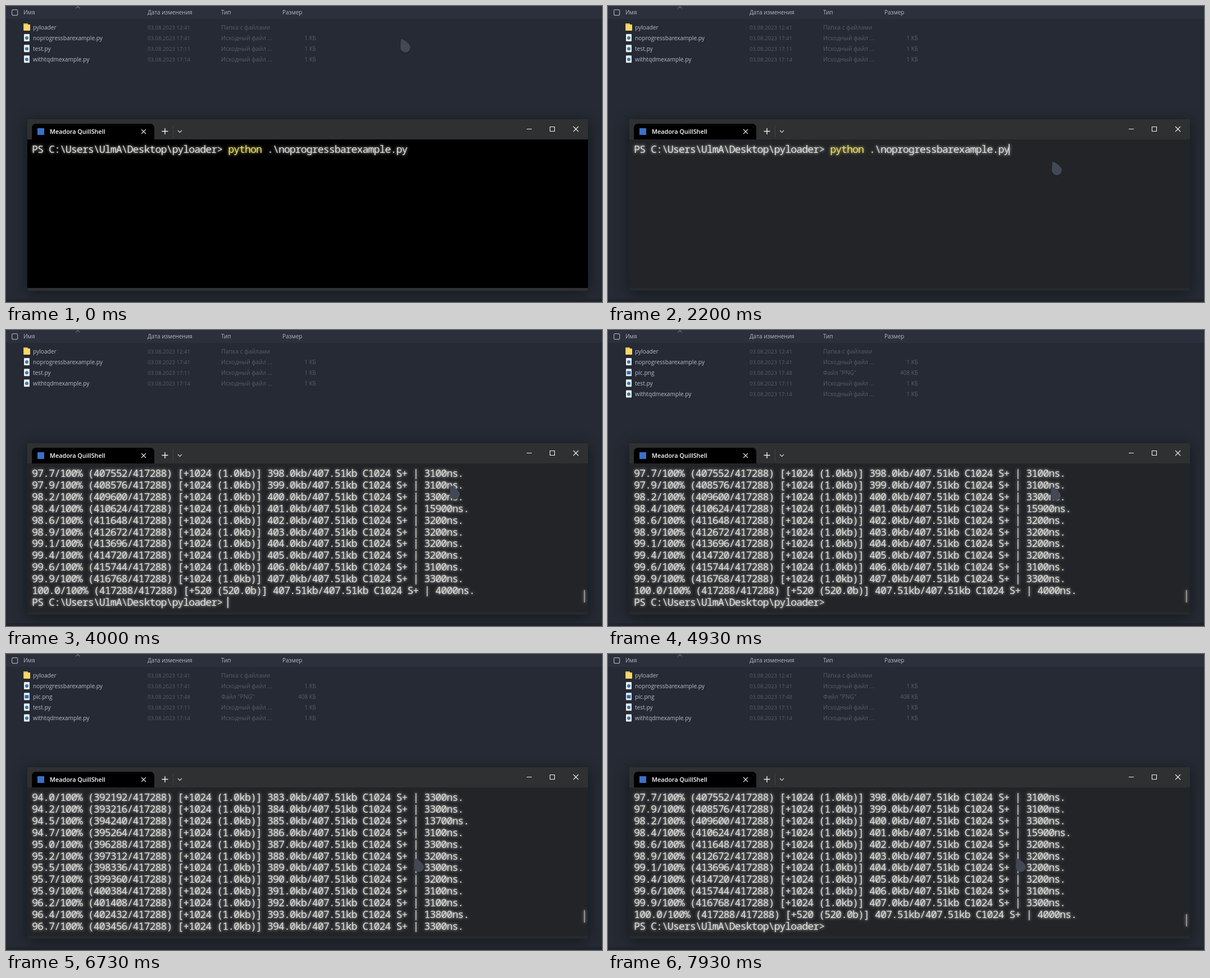
Recreate the animation shown at these times as an HTML page with a canvas. Size 1061 by 528 pixels, loop 8000 ms.

```html
<!DOCTYPE html>
<html lang="ru">
<head>
<meta charset="utf-8">
<style>
html, body { margin: 0; width: 100%; height: 100%; overflow: hidden; background: #252a34; }
canvas { display: block; }
</style>
</head>
<body>
<canvas id="stage" width="1061" height="528"></canvas>
<script>
const LOOP = 8000, ROWS = 12, CELL = 9.975, LINE = 20.9, LEFT = 46;
const CHUNK = 1024, TOTAL = 417288, LAST = Math.ceil(TOTAL / CHUNK);
const START = 2870, OUTPUT = 3330, FINISH = 3470, FILE_SHOWN = 4470;
const UI = '"Open Sans", "Noto Sans", sans-serif';
const MONO = '"Noto Sans Mono", "DejaVu Sans Mono", monospace';
const ctx = document.getElementById('stage').getContext('2d');

const PROMPT = 'PS C:\\Users\\UlmA\\Desktop\\pyloader> ';
const COMMAND = 'python', ARGUMENT = ' .\\noprogressbarexample.py';

const clamp = (v, lo, hi) => Math.min(hi, Math.max(lo, v));
const smooth = u => u * u * (3 - 2 * u);
const random = n => Math.abs(Math.sin(n * 12.9898) * 43758.5453) % 1;

// Every eighth chunk flushes a buffer and takes longer.
function timing(n) {
  if (n === LAST) return 4000;
  return n % 8 === 1 ? 13000 + 100 * Math.floor(random(n) * 40)
                     : 3100 + 100 * Math.floor(random(n) * 3);
}

function progressLine(n) {
  const done = Math.min(n * CHUNK, TOTAL), last = n === LAST;
  const step = last ? '+520 (520.0b)' : '+1024 (1.0kb)';
  const size = last ? '407.51' : n.toFixed(1);
  return `${(done / TOTAL * 100).toFixed(1)}/100% (${done}/${TOTAL}) [${step}] ` +
    `${size}kb/407.51kb C1024 S+ | ${timing(n)}ns.`;
}

// Pointer stops: time, x, y
const stops = [
  [130, 702, 59], [730, 796, 275], [1470, 796, 275], [2000, 790, 278],
  [4400, 790, 278], [4930, 788, 280], [5530, 787, 276], [6070, 726, 365]
];
function pointerAt(t) {
  let [, x, y] = stops[0];
  for (let i = 1; i < stops.length; i++) {
    const [t0, x0, y0] = stops[i - 1], [t1, x1, y1] = stops[i];
    const u = smooth(clamp((t - t0) / (t1 - t0), 0, 1));
    x += (x1 - x0) * u;
    y += (y1 - y0) * u;
  }
  return [x, y];
}

// Wheel notches come in bursts and move three lines each.
const burst = (t, start, count) => clamp(Math.floor((t - start) / 66) + 1, 0, count);
const scrollAt = t =>
  3 * (burst(t, 6130, 1) + burst(t, 6470, 4) + burst(t, 6930, 2) - burst(t, 7530, 7));

function caretOn(t) {
  const period = 1050, since = t < START ? t - 1070 : t - START;
  return (since + 2 * period) % period < period / 2;
}

function box(x, y, w, h, color, radius = 0) {
  ctx.fillStyle = color;
  ctx.beginPath();
  ctx.roundRect(x, y, w, h, radius);
  ctx.fill();
}
function dot(x, y, r, color) {
  ctx.fillStyle = color;
  ctx.beginPath();
  ctx.arc(x, y, r, 0, 7);
  ctx.fill();
}
function stroke(d, color, width = 1) {
  ctx.strokeStyle = color;
  ctx.lineWidth = width;
  ctx.stroke(new Path2D(d));
}
function label(text, x, y, size, color, align = 'left', weight = 400) {
  ctx.font = `${weight} ${size}px ${UI}`;
  ctx.fillStyle = color;
  ctx.textAlign = align;
  ctx.fillText(text, x, y + 3.7);
}

function icon(kind, y) {
  if (kind === 'folder') {
    box(31, y - 7, 8, 13, '#e9b83f', 1);
    box(32, y - 5, 11, 11, '#fbd768', 1);
    return;
  }
  box(32, y - 7, 10, 13, '#e9edf2', 1);
  if (kind === 'image') box(33.5, y - 3, 7, 6, '#2f6fb5');
  else dot(37, y, 3, '#3b77a8');
}

function explorer(t) {
  box(0, 0, 1061, 528, '#252a34');
  box(0, 0, 1061, 23, '#2c303c');
  box(0, 523, 1061, 5, '#21252e');
  ctx.strokeStyle = '#a5a8b0';
  ctx.lineWidth = 1.2;
  ctx.beginPath();
  ctx.roundRect(10.6, 6.6, 10, 10, 2);
  ctx.stroke();
  stroke('M124.5 4 128 .8 131.5 4', '#989ba3');
  const heads = { 'Имя': 31, 'Дата изменения': 252, 'Тип': 383, 'Размер': 492 };
  for (const head in heads) label(head, heads[head], 11.5, 10, '#b4b7c0');

  const source = 'Исходный файл ...';
  const files = [
    ['folder', 'pyloader', '12:41', 'Папка с файлами', ''],
    ['script', 'noprogressbarexample.py', '17:41', source, '1 КБ'],
    ['script', 'test.py', '17:11', source, '1 КБ'],
    ['script', 'withtqdmexample.py', '17:14', source, '1 КБ']
  ];
  if (t >= FILE_SHOWN) files.splice(2, 0, ['image', 'pic.png', '17:48', 'Файл "PNG"', '408 КБ']);
  files.forEach(([kind, name, time, type, size], i) => {
    const y = 38 + i * 19.1, dim = '#585d67';
    icon(kind, y);
    label(name, 48, y, 10.2, '#b9bcc5');
    label('03.08.2023 ' + time, 252, y, 9.6, dim);
    label(type, 383, y, 10.4, dim);
    label(size, 552, y, 10, dim, 'right');
  });
}

function windowFrame(t) {
  ctx.save();
  ctx.shadowColor = 'rgba(0,0,0,.45)';
  ctx.shadowBlur = 26;
  ctx.shadowOffsetY = 4;
  box(38, 202, 998, 306, '#2f3031', [1, 1, 4, 4]);
  ctx.restore();
  box(38, 238, 998, 265, '#000');
  ctx.globalAlpha = clamp((t - 1065) / 135, 0, 1);
  box(38, 238, 998, 265, '#222427');
  box(38, 503, 998, 5, '#262a2d', [0, 0, 4, 4]);
  ctx.globalAlpha = 1;
  box(46, 210, 218, 28, '#000', [7, 7, 0, 0]);
  box(56, 218, 12, 12, '#3c70c8');
  label('Meadora QuillShell', 78, 224, 10.8, '#fff', 'left', 600);
  stroke('M241 220l8 8m0-8l-8 8', '#e4e4e4', 1.1);
  stroke('M277.5 223.5h11m-5.5-5.5v11', '#f0f0f0', 1.4);
  stroke('M297.5 213v21', '#434446');
  stroke('M306 222l3.5 3.5 3.5-3.5', '#d8d8d8', 1.1);
  stroke('M927 219.5h9M968.5 215.5h8v8h-8zM1010 215l9 9m0-9l-9 9', '#f0f0f0', 1.1);
}

function terminalText(text, column, row, color = '#dededa') {
  ctx.fillStyle = color;
  ctx.shadowColor = color;
  ctx.fillText(text, LEFT + column * CELL, 262 + row * LINE);
}
function terminal(t) {
  const scroll = scrollAt(t), finished = t >= FINISH;
  let caret = [PROMPT.length + COMMAND.length + ARGUMENT.length, 0];

  ctx.save();
  ctx.font = `18.5px ${MONO}`;
  ctx.fontStretch = 'condensed';
  ctx.letterSpacing = '0px';
  ctx.letterSpacing = CELL - ctx.measureText('0').width + 'px';
  ctx.textAlign = 'left';
  ctx.shadowBlur = 5;
  if (t < OUTPUT) {
    terminalText(PROMPT, 0, 0);
    terminalText(COMMAND, PROMPT.length, 0, '#ece06a');
    terminalText(ARGUMENT, PROMPT.length + COMMAND.length, 0);
    if (t >= START) caret = [0, 1];
  } else {
    const printed = 95 + Math.floor((t - OUTPUT) / 66) * 150;
    const bottom = finished ? LAST + 1 - scroll : Math.min(printed, LAST);
    for (let row = 0; row < ROWS; row++) {
      const n = bottom - ROWS + 1 + row;
      terminalText(n > LAST ? PROMPT : progressLine(n), 0, row);
    }
    caret = [finished ? PROMPT.length : 0, ROWS - 1];
    if (printed > 95) box(1029, 464 - scroll * .47, 1.5, 22, '#a5a6a7');
  }
  ctx.shadowColor = '#ddd';
  if (!scroll && caretOn(t))
    box(LEFT + caret[0] * CELL - 1, 246 + caret[1] * LINE, 1.5, 20, '#e8e8e8');
  ctx.restore();
}

function pointer(t) {
  ctx.save();
  ctx.translate(...pointerAt(t));
  ctx.shadowColor = 'rgba(0,0,0,.3)';
  ctx.shadowBlur = 2;
  ctx.shadowOffsetY = 1;
  ctx.fillStyle = '#424855';
  ctx.fill(new Path2D('M2 0Q.8 0 .8 2L0 15A9 9 0 1 0 18 15C18 10 10 3 4 .6Q3 0 2 0Z'));
  ctx.restore();
}

function frame() {
  const t = performance.now() % LOOP;
  explorer(t);
  windowFrame(t);
  terminal(t);
  pointer(t);
  requestAnimationFrame(frame);
}
frame();
</script>
</body>
</html>
```
